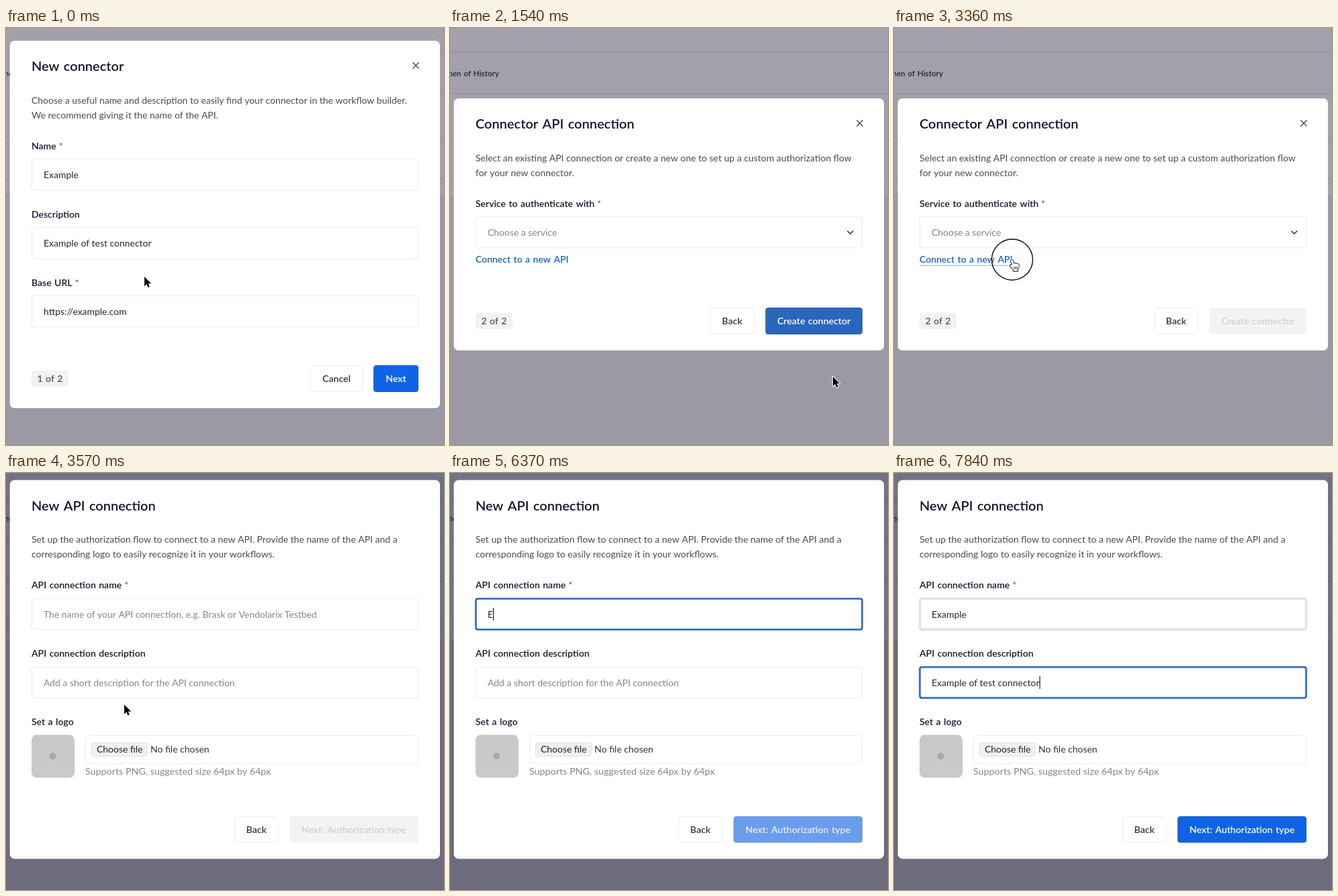
Write an HTML page with a canvas that moves like this. It is 652 px wide and 622 px high and loops after 8000 ms.

```html
<!DOCTYPE html>
<html lang="en">
<head>
<meta charset="utf-8">
<title>New connector</title>
<style>
html, body { margin: 0; width: 100%; height: 100%; overflow: hidden; background: #9a99a5; }
canvas { display: block; width: 652px; height: 622px; }
</style>
</head>
<body>
<canvas id="stage"></canvas>
<script>
const W = 652, H = 622, LOOP = 8000, STEP = 70;
const canvas = document.getElementById('stage');
const ratio = window.devicePixelRatio || 1;
canvas.width = W * ratio;
canvas.height = H * ratio;
const ctx = canvas.getContext('2d');
ctx.scale(ratio, ratio);

const INK = '#17152e', BODY = '#4a4955', HINT = '#85858b', LINE = '#ededef';
const BLUE = [15, 100, 230], DEEP = [42, 102, 190], OFF = [243, 243, 243];
const OFF_TEXT = [209, 209, 213], WHITE = [255, 255, 255];

// Boxes are [x, y, width, height]
const NEXT = [547.5, 503.5, 66, 39];
const NAME = [38.5, 187.5, 575, 46];
const ABOUT = [38.5, 289.5, 575, 46];

const clamp = v => Math.max(0, Math.min(1, v));
const ease = p => p * p * (3 - 2 * p);
const ramp = (t, from, to) => clamp((t - from) / (to - from));
const mix = (a, b, p) => `rgb(${a.map((v, i) => Math.round(v + (b[i] - v) * p))})`;
const inside = ([x, y], [bx, by, w, h]) => x >= bx && x <= bx + w && y >= by && y <= by + h;

// Pointer stops: time, x, y
const STOPS = [
  [0, 206, 371], [840, 565, 519], [980, 570, 520], [2100, 570, 520],
  [2940, 232, 336], [3290, 176, 345.5], [4760, 176, 345.5], [5530, 185.5, 211]
];

function pointer(t) {
  const i = STOPS.findIndex(s => s[0] > t);
  if (i === 0) return STOPS[0].slice(1);
  if (i < 0) return STOPS[STOPS.length - 1].slice(1);
  const a = STOPS[i - 1], b = STOPS[i], p = ease(ramp(t, a[0], b[0]));
  return [a[1] + (b[1] - a[1]) * p, a[2] + (b[2] - a[2]) * p];
}

// Hover fades in and out over three steps
const hover = (t, box) =>
  [0, 1, 2].reduce((sum, k) => sum + inside(pointer(t - k * STEP), box), 0) / 3;

// Only the heavier weight needs wider word gaps
function setFont(weight, size) {
  ctx.font = `${weight} ${size}px Lato, "Open Sans", sans-serif`;
  ctx.wordSpacing = (weight > 400 ? size * 0.07 : 0) + 'px';
}

function text(str, x, y, color, weight = 400, size = 13.95, align = 'left') {
  setFont(weight, size);
  ctx.textAlign = align;
  ctx.fillStyle = color;
  ctx.fillText(str, x, y);
  return ctx.measureText(str).width;
}

function rect([x, y, w, h], r, fill, stroke, width = 1) {
  ctx.beginPath();
  ctx.roundRect(x, y, w, h, r);
  if (fill) { ctx.fillStyle = fill; ctx.fill(); }
  if (stroke) { ctx.strokeStyle = stroke; ctx.lineWidth = width; ctx.stroke(); }
}

function path(d, stroke, width, fill) {
  const p = new Path2D(d);
  ctx.lineJoin = ctx.lineCap = 'round';
  if (stroke) { ctx.strokeStyle = stroke; ctx.lineWidth = width; ctx.stroke(p); }
  if (fill) { ctx.fillStyle = fill; ctx.fill(p); }
}

function backdrop(row, line, page, ink) {
  ctx.fillStyle = page;
  ctx.fillRect(0, 0, W, H);
  ctx.fillStyle = row;
  ctx.fillRect(0, 0, W, 250);
  ctx.fillStyle = line;
  for (const y of [35.5, 97.5, 161.5, 224.5, 249.5]) ctx.fillRect(0, y, W, 1.5);
  text('Women of History', 73, 72, ink, 600, 11.7, 'right');
}

function dialog(top, bottom, title, lines) {
  rect([5.7, top, 640.3, bottom - top], 7, '#fff');
  text(title, 38, top + 45, INK, 600, 20);
  lines.forEach((s, i) => text(s, 38, top + 93.5 + i * 22, BODY));
}

function close(y) {
  path(`M605.8 ${y - 4.2}l8.4 8.4m0-8.4l-8.4 8.4`, '#3f3e4a', 1.3);
}

function label(str, y, required) {
  const w = text(str, 38, y, INK, 600, 14);
  if (required) text('*', 38 + w + 4, y, '#b5443f', 600, 14);
}

function field(box, value, color, hovered = 0, focused = 0) {
  const rings = [
    [hovered * (1 - focused), '#f1f1f2', 4.5, '#dcdcde', 1.8],
    [focused, '#cfe2fb', 4.5, '#1a53ad', 2]
  ];
  rect(box, 3, '#fff', LINE, 1.2);
  for (const [alpha, glow, glowWidth, edge, edgeWidth] of rings) {
    ctx.globalAlpha = alpha;
    rect(box, 3, null, glow, glowWidth);
    rect(box, 3, null, edge, edgeWidth);
  }
  ctx.globalAlpha = 1;
  text(value, 56, box[1] + 28, color);
}

function button(box, str, fill = '#fff', color = '#33323f', edge = LINE) {
  rect(box, 3.5, fill, edge);
  text(str, box[0] + box[2] / 2, box[1] + box[3] / 2 + 5, color, 600, 14.1, 'center');
}

function badge(str, y) {
  rect([38, y, 55, 24], 4, '#f2f2f3');
  text(str, 65.5, y + 17, '#55545f', 600, 14, 'center');
}

function caret(str, y) {
  setFont(400, 13.95);
  ctx.fillStyle = '#1d1c2c';
  ctx.fillRect(56 + ctx.measureText(str).width, y, 1.2, 19);
}

function ring(x, y, alpha) {
  ctx.globalAlpha = alpha;
  ctx.beginPath();
  ctx.arc(x, y, 30.5, 0, Math.PI * 2);
  ctx.strokeStyle = '#0a0a0a';
  ctx.lineWidth = 1.4;
  ctx.stroke();
  ctx.globalAlpha = 1;
}

const CURSORS = {
  arrow() {
    path('M0 0v14.2l3.3-3.1 2.1 5 2.4-1-2.1-4.9h4.5z', '#fff', 2.2, '#000');
  },
  hand() {
    const shape = 'M-2.2 1.6c0-2 3-2 3.2 0l.8 4.4c.6-1.4 2.6-1.2 2.9.3 .8-1 2.4-.6 2.7.6 ' +
      '.9-.7 2.4-.2 2.4 1.2 .2 3-.3 4.8-1.6 6.6v2.3h-6.4v-1.8c-1.6-1.5-3-3.6-4.6-5.4 ' +
      '-1.2-1.5.5-2.7 1.9-1.7l1 .9z';
    path(shape, '#fff', 3);
    path(shape, '#000', 1.8, '#fff');
    path('M2.8 10.5v3.5M4.9 10.5v3.5M7 10.5v3.5', '#000', 0.8);
  },
  beam() {
    const shape = 'M-3-7.5q3 0 3 2v11q0 2-3 2M3-7.5q-3 0-3 2v11q0 2 3 2M-1.3 2.5h2.6';
    path(shape, '#fff', 2.4);
    path(shape, '#000', 1.1);
  }
};

function cursor([x, y], kind) {
  ctx.save();
  ctx.translate(x, y);
  CURSORS[kind]();
  ctx.restore();
}

function connectorForm(t) {
  const at = pointer(t);
  backdrop('#a1a0ab', '#9796a3', '#9a99a5', '#23223a');
  dialog(19, 567, 'New connector', [
    'Choose a useful name and description to easily find your connector in the workflow builder.',
    'We recommend giving it the name of the API.'
  ]);
  close(56);
  label('Name', 180.5, true);
  field([38.5, 195.5, 575, 46.5], 'Example', '#26253a');
  label('Description', 282.5);
  field([38.5, 297.5, 575, 46.5], 'Example of test connector', '#26253a');
  label('Base URL', 384.5, true);
  field([38.5, 399.5, 575, 46.5], 'https://example.com', '#26253a');
  badge('1 of 2', 511);
  button([453.5, 503.5, 77, 39], 'Cancel');
  button(NEXT, 'Next', mix(BLUE, DEEP, hover(t, NEXT)), '#fff', '#1a59bd');
  if (t >= 1400) ring(...at, t < 1470 ? 0.5 : 1);
  cursor(at, inside(at, NEXT) ? 'hand' : 'arrow');
}

function serviceForm(t) {
  const at = pointer(t), off = ramp(t, 1540, 1680);
  backdrop('#a1a0ab', '#9796a3', '#9a99a5', '#23223a');
  dialog(105, 481, 'Connector API connection', [
    'Select an existing API connection or create a new one to set up a custom authorization flow',
    'for your new connector.'
  ]);
  close(142);
  label('Service to authenticate with', 266.5, true);
  field([38.5, 281.5, 575, 46.5], 'Choose a service', HINT);
  path('M591.8 303l4 4 4-4', '#2b2a38', 1.5);
  const w = text('Connect to a new API', 38, 349.8, '#1a62b8', 600, 14);
  if (t >= 3290) {
    ctx.fillStyle = '#b9cdea';
    ctx.fillRect(38, 353.5, w, 1.6);
  }
  badge('2 of 2', 425);
  button([387.5, 417.5, 65, 39], 'Back');
  button([470, 417.5, 143.5, 39], 'Create connector',
    mix(DEEP, OFF, off), mix(WHITE, OFF_TEXT, off), mix([36, 92, 176], OFF, off));
  if (t >= 3290) ring(...at, t < 3360 ? 0.5 : 1);
  cursor(at, t >= 3290 ? 'hand' : 'arrow');
}

// When each letter of the name lands
const KEYS = [6300, 6510, 6650, 6720, 6930, 7000, 7070];

function apiForm(t) {
  const at = pointer(t);
  const name = 'Example'.slice(0, KEYS.filter(k => t >= k).length);
  const about = t >= 7770 ? 'Example of test connector' : '';
  const swap = ramp(t, 7210, 7420);
  const ready = ramp(t, 6190, 6490);

  backdrop('#727285', '#6a6a7d', '#6c6c7d', '#201f33');
  dialog(10.5, 575.5, 'New API connection', [
    'Set up the authorization flow to connect to a new API. Provide the name of the API and a',
    'corresponding logo to easily recognize it in your workflows.'
  ]);
  label('API connection name', 172, true);
  field(NAME, name || 'The name of your API connection, e.g. Brask or Vendolarix Testbed',
    name ? '#26253a' : HINT, hover(t, NAME), ramp(t, 5600, 5740) * (1 - swap));
  label('API connection description', 274);
  field(ABOUT, about || 'Add a short description for the API connection',
    about ? '#26253a' : HINT, hover(t, ABOUT), swap);

  label('Set a logo', 376);
  rect([38, 390.5, 64, 64], 8, '#c9c9c9');
  rect([64.5, 417.5, 10, 10], 5, '#a9a9a9');
  rect([118.5, 391.5, 495, 42], 5, '#fff', LINE, 1.2);
  rect([127.5, 402.5, 83, 20], 3, '#f0f0f0', '#e4e4e6');
  text('Choose file', 135, 417, '#1f1e2c');
  text('No file chosen', 215, 417, '#33323f');
  text('Supports PNG, suggested size 64px by 64px', 118, 449.5, HINT, 400, 14.3);

  button([340.5, 512.5, 64.5, 38], 'Back');
  button([422.5, 512.5, 191, 38.5], 'Next: Authorization type',
    mix(OFF, BLUE, ready), mix(OFF_TEXT, WHITE, ready), mix(OFF, [26, 89, 189], ready));

  if (t >= 7280) caret(about, 303);
  else if (t >= 5670 && (t < 6160 || t >= 6300)) caret(name, 201);
  if (t < 6300) cursor(at, inside(at, NAME) || inside(at, ABOUT) ? 'beam' : 'arrow');
}

function draw(now) {
  const t = Math.floor(now % LOOP / STEP) * STEP;
  if (t < 1540) connectorForm(t);
  else if (t < 3570) serviceForm(t);
  else apiForm(t);
}

const start = performance.now();
function tick() {
  draw(performance.now() - start);
  requestAnimationFrame(tick);
}
tick();
</script>
</body>
</html>
```
